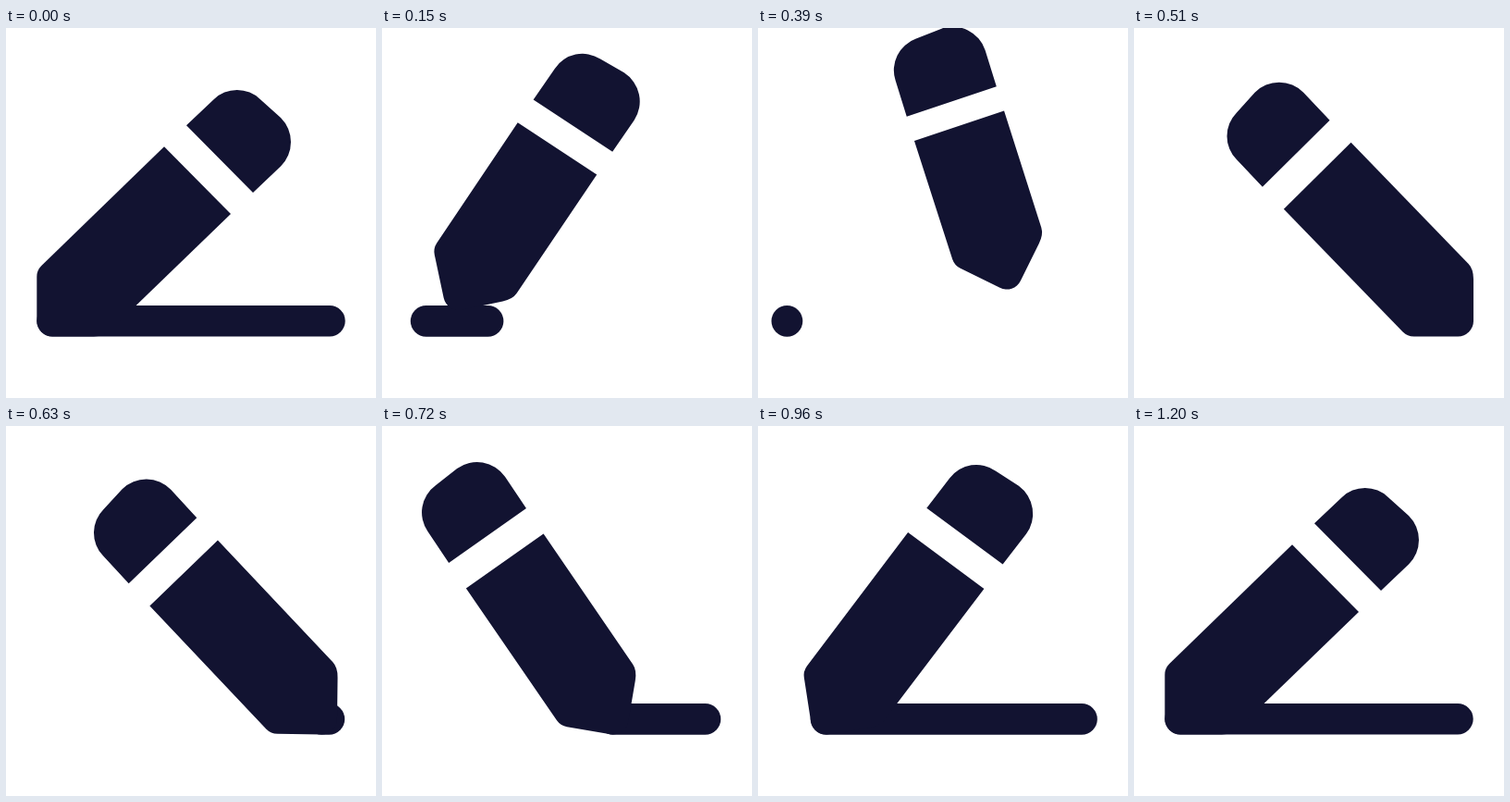
An HTML page that plays this animation: 400x400 px, repeating every 2.23 s.

```html
<!DOCTYPE html>
<html lang="en">
<head>
<meta charset="utf-8">
<title>Pencil drawing a line</title>
<style>
  html, body { margin: 0; width: 100%; height: 100%; overflow: hidden; background: #fff; }
  svg { display: block; width: 100vw; height: 100vh; }
  path { fill: #121331; }
  line { stroke: #121331; stroke-width: 33.8; stroke-linecap: round; }
  line.rest { stroke-width: 33.4; transform: translateY(-.2px); }
</style>
</head>
<body>
<svg viewBox="0 0 400 400">
  <line id="stroke" x1="50" y1="316.9" x2="350" y2="316.9"/>
  <g id="pencil">
    <path id="body"/>
    <path id="cap" d="M195 105.3L224.6 77.2A36 36 0 0 1 275 77.2L297 97A37 37 0 0 1 297 149.6L267 178Z"/>
  </g>
</svg>
<script>
const LOOP = 2230, STEP = 30, BASE = 316.7;
const [stroke, pencil, body, cap] =
  ['stroke', 'pencil', 'body', 'cap'].map(id => document.getElementById(id));

// cubic-bezier easing, solved by bisection
function bezier(x1, y1, x2, y2) {
  const at = (a, b, t) => 3 * (1 - t) ** 2 * t * a + 3 * (1 - t) * t * t * b + t ** 3;
  return x => {
    if (x <= 0) return 0;
    if (x >= 1) return 1;
    let lo = 0, hi = 1;
    for (let i = 0; i < 30; i++) {
      const mid = (lo + hi) / 2;
      if (at(x1, x2, mid) < x) lo = mid; else hi = mid;
    }
    return at(y1, y2, lo);
  };
}

const tilt = bezier(.4, 0, .8, .85);
const travel = bezier(.49, 0, .73, .85);
const erase = bezier(.3, 0, .3, 1);
const glide = bezier(.34, .05, .07, 1);
const swing = bezier(.52, 0, .1, 1);
const arch = p => 4 * p * (1 - p);

// x, y: centre of the tip; squash shortens the barrel, pinch the gap below the cap
function setPencil(x, y, angle, squash, pinch) {
  const ux = .717, uy = -.697, s = squash - pinch;
  pencil.setAttribute('transform',
    `translate(${x} ${y}) rotate(${angle}) translate(-50 ${-BASE})`);
  cap.setAttribute('transform', `translate(${-ux * squash} ${-uy * squash})`);
  body.setAttribute('d',
    `M${171 - ux * s} ${128.3 - uy * s}L${243 - ux * s} ${201 - uy * s}` +
    'L111.6 328Q106 333.4 95 333.4H50A16.7 16.7 0 0 1 33.3 316.7V269Q33.3 262 38.3 257Z');
}

function setLine(x1, x2, shown) {
  stroke.setAttribute('x1', x1);
  stroke.setAttribute('x2', Math.max(x2, x1 + .01));
  stroke.setAttribute('visibility', shown ? 'visible' : 'hidden');
}

function draw(t) {
  if (t < 585) {
    // hop over to the right while the line retracts
    const k = t / 510, p = tilt(k), a = arch(p);
    setPencil(50 + 300.3 * travel(k), BASE - 61.5 * a, -90 * p, 68 * a, 7 * a);
    const left = 50 - 18.6 * (t / 390) ** 2.2;
    setLine(left, left + 300 * (1 - erase(t / 285)), t < 410);
  } else {
    // glide back, drawing the line
    const k = (t - 585) / 615, q = glide(k), p = swing(k);
    const x = 350.3 - 300.3 * q;
    setPencil(x, BASE, -90 * (1 - p), 13 * arch(q), 0);
    setLine(x, 349.3 + .7 * p, true);
  }
  stroke.classList.toggle('rest', t === 0 || t >= 1200);
}

const start = performance.now();
function tick() {
  const t = (performance.now() - start) % LOOP;
  draw(Math.floor(t / STEP) * STEP);
  requestAnimationFrame(tick);
}
tick();
</script>
</body>
</html>
```
